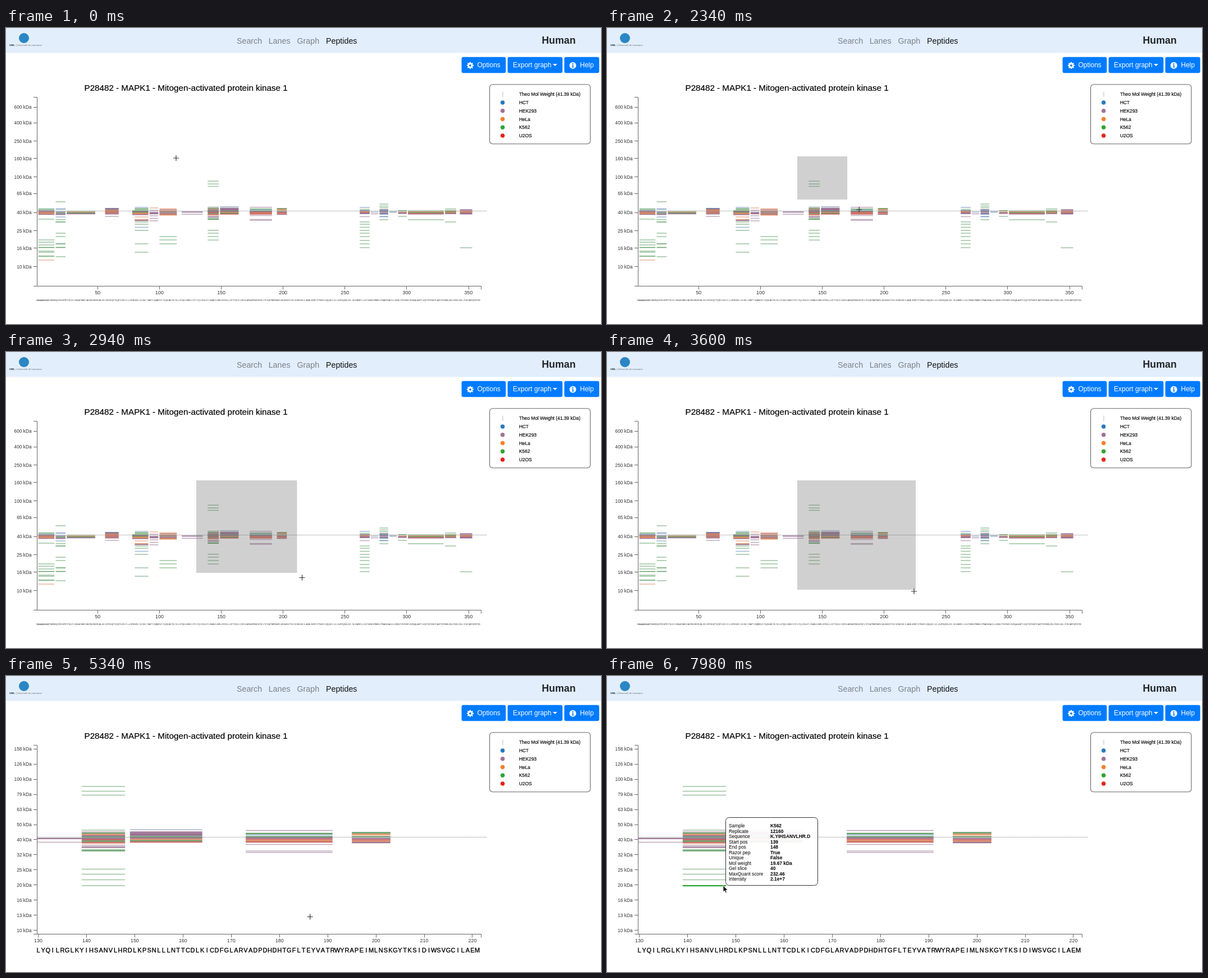
An HTML page for the animation above (8 s loop, 1060 by 528 pixels).

```html
<!DOCTYPE html>
<html lang="en">
<head>
<meta charset="utf-8">
<title>Peptide view</title>
<style>
html, body { margin: 0; width: 100%; height: 100%; overflow: hidden; background: #fff; }
svg { display: block; width: 100vw; height: 100vh; font-family: "Liberation Sans", Arial, sans-serif; }
</style>
</head>
<body>
<svg id="stage" viewBox="0 0 1060 528"></svg>
<script>
const LOOP = 8000, STEP = 60;
const ZOOM_AT = 4560, PRESS = 1500, RELEASE = 3240, BRUSH_LAG = 120, TIP_AT = 7680;
const LEFT = 55.5, BASE = 460.5, TOP = 123;
const COLORS = { b: '#2879bd', p: '#9f7298', o: '#f97f2a', g: '#2ea42f', r: '#e5231b' };
const MUTED = { b: '#5580a8', p: '#8c5f86', o: '#d97a4a', g: '#4b9150', r: '#c4524c' };
const SEQ = 'MAAAAAAGAGPEMVRGQVFDVGPRYTNLSYIGEGAYGMVCSAYDNVNKVRVAIKKISPFEHQTYCQRTLREIKILLRFRHENIIGIND' +
  'IIRAPTIEQMKDVYIVQDLMETDLYKLLKTQHLSNDHICYFLYQILRGLKYIHSANVLHRDLKPSNLLLNTTCDLKICDFGLARVADPDHDHTGFLTEYVATRWYR' +
  'APEIMLNSKGYTKSIDIWSVGCILAEMLSNRPIFPGKHYLDQLNHILGILGSPSQEDLNCIINLKARNYLLSLPHKNKVPWNRLFPNADSKALDLLDKMLTFNPHK' +
  'RIEVEQALAHPYLEQYYDPSDEPIAEPFKFDMELDDLPKEKLKELIFEETARFQPGYRS';

// Start, end, then bands: a level in overview pixels and a run of colours
// stacked downwards from it. Capitals are strong bands.
const PEPTIDES = [
  [2, 15, '323G 325.5BOPOOP 341g 378g 382g 387g 391.5G 398g 400g 407G 414o'],
  [16, 24, '310g 323B 327bpGpP 337b 342g 346G 366g 372g 385G 391.5G 408g'],
  [25, 48, '326.8g 328.5OGP'],
  [56, 67, '321.8BPOROPOP 336p'],
  [78, 91, '326GPGOOP'],
  [80, 91, '320b 322.5Gg 337o 342OP 346g 350g 355.5b 361g 385g 400g'],
  [92, 99, '321o 325p 328.5pPP 335p 339.5p 344p'],
  [100, 114, '323OpoOBOPO 334o 372g 378g 385g'],
  [118, 135, '328.3P 332.2p', 139],
  [139, 148, '273.2g 278.2g 282.4g 319.4g 321.2pGOPGPRGRo 335.7p 337.5P 339.9g 341.2G 360.7g 366g 371.9g 378.2g'],
  [149, 164, '318.8b 321p 322.1PPPGPOGR'],
  [173, 191, '319.8p 323Gb 326.3GPROR 334.6p 341.5p 343p'],
  [195, 203, '322.1G 323.7OoG 328.3PROP'],
  [262, 270, '320b 323.5g 325.5BOOPP 336.5p 346g 350g 355.5g 361g 366g 372g 379g 385g 391.7g'],
  [271, 277, '328.5b 331.5p'],
  [278, 285, '314g 317.5g 320.5g 323.5pBgPpPB 336.5B 342g'],
  [286, 292, '327b 329b'],
  [293, 300, '326G 328.5OPp 336g'],
  [301, 330, '326.3g 328OGRp 342g'],
  [331, 340, '322.8g 325.5gOGOP 346g'],
  [343, 353, '324P 326POOPP 392g']
];

// time, x, y of the pointer
const TRACK = [
  [0, 303, 232], [900, 303, 232], [1440, 339, 229], [1560, 339, 229], [1680, 349, 237], [1800, 354, 243],
  [2520, 481, 351], [2640, 505, 381], [3240, 550, 424], [3600, 547, 427], [4300, 541.7, 429.5],
  [5400, 541.7, 429.5], [6420, 420, 379], [7640, 216, 377], [7800, 207, 374], [8000, 207, 374]
];

const overview = {
  x: i => 53.2 + 2.2023 * i,
  y: level => level,
  masses: [600, 400, 250, 160, 100, 65, 40, 25, 16, 10],
  first: 1, last: 360, every: 50, width: 1.5, strong: 1.7, seqSize: 2.6, seqY: 487
};
const detail = {
  x: i => 57.5 + 8.594 * (i - 130),
  y: level => 453.8 - (425.5 - level) / 0.5932,
  masses: Array.from({ length: 13 }, (_, k) => 10 ** (2.2 - k / 10)),
  first: 130, last: 221, every: 10, width: 1.6, strong: 2.3, seqSize: 11, seqY: 493, zoomed: true
};

const stage = document.getElementById('stage');

function add(parent, tag, attrs, content) {
  const node = document.createElementNS('http://www.w3.org/2000/svg', tag);
  for (const key in attrs) node.setAttribute(key, attrs[key]);
  if (content !== undefined) node.textContent = content;
  parent.appendChild(node);
  return node;
}
const text = (parent, x, y, size, content, more) =>
  add(parent, 'text', { x, y, 'font-size': size, fill: '#000', ...more }, content);
const path = (parent, d, stroke, width = 1, more) =>
  add(parent, 'path', { d, stroke, 'stroke-width': width, fill: 'none', ...more });
const rect = (parent, x, y, width, height, more) =>
  add(parent, 'rect', { x, y, width, height, ...more });
const dot = (parent, cx, cy, r, fill) => add(parent, 'circle', { cx, cy, r, fill });
const half = v => Math.round(v - 0.5) + 0.5;
const levelOf = mass => 425.5 - 69.48 * Math.log(mass / 10);

function drawHeader() {
  rect(stage, 0, 0, 1060, 44.4, { fill: '#e2eefc' });
  dot(stage, 32, 18, 9, '#2a86c4');
  text(stage, 6, 31.8, 4.2, 'UNIL', { 'font-weight': 'bold', fill: '#222' });
  text(stage, 17.6, 31.8, 4.2, '| Université de Lausanne', { fill: '#666' });
  [['Search', 411], ['Lanes', 467.7], ['Graph', 518.5], ['Peptides', 570]].forEach(([name, x], i) =>
    text(stage, x, 27.5, 14.25, name, { fill: i === 3 ? '#111' : '#7b8187' }));
  text(stage, 954.5, 28, 17.8, 'Human', { 'font-weight': 'bold', fill: '#212529' });
}

function drawButtons() {
  [[811.6, 78.8], [893.6, 97.8], [994.6, 62.2]].forEach(([x, w]) =>
    rect(stage, x, 51.8, w, 28.5, { rx: 3.2, fill: '#007bff' }));
  const label = (x, s) => text(stage, x, 70.2, 12, s, { fill: '#fff' });
  label(839.5, 'Options');
  label(903, 'Export graph');
  label(1022.5, 'Help');
  add(stage, 'circle', { cx: 827, cy: 66.8, r: 3.2, fill: 'none', stroke: '#fff', 'stroke-width': 2.6 });
  for (let a = 0; a < 8; a++)
    rect(stage, 825.8, 60.8, 2.4, 2.4, { fill: '#fff', transform: `rotate(${a * 45} 827 66.8)` });
  path(stage, 'M974 64h8l-4 4z', 'none', 0, { fill: '#fff' });
  dot(stage, 1009.8, 66.8, 6, '#fff');
  dot(stage, 1009.8, 63.7, 1.1, '#007bff');
  path(stage, 'M1008.4 66.2h1.6v3.6m-1.8 0h3.4', '#007bff', 1.4);
}

function drawLegend() {
  rect(stage, 861.6, 100.8, 179.4, 105.9, { rx: 5.5, fill: '#fff', stroke: '#666', 'stroke-width': 1.1 });
  const rows = ['Theo Mol Weight (41.39 kDa)', 'HCT', 'HEK293', 'HeLa', 'K562', 'U2OS'];
  rows.forEach((name, i) => {
    const y = 118.3 + 14.75 * i;
    text(stage, 914, y + 3, 8.4, name, { stroke: '#000', 'stroke-width': 0.15 });
    if (i) dot(stage, 884.7, y, 3.7, Object.values(COLORS)[i - 1]);
    else path(stage, 'M885 113.5v9.5', '#bbb');
  });
}

function drawAxes(g, view) {
  const line = d => path(g, d, '#666');
  line(`M49 ${TOP + 0.5}H${LEFT}V${BASE}`);
  line(`M49 ${BASE}H846.5v6`);
  for (const mass of view.masses) {
    const y = view.y(levelOf(mass));
    line(`M49 ${half(y)}H${LEFT}`);
    text(g, 45.5, y + 3, 8.3, Math.round(mass) + ' kDa', { 'text-anchor': 'end', fill: '#333' });
  }
  for (let i = view.zoomed ? 130 : 50; i <= view.last; i += view.every) {
    line(`M${half(view.x(i))} ${BASE}v6`);
    text(g, view.x(i), 475.3, 8.9, i, { 'text-anchor': 'middle', fill: '#333' });
  }
}

function drawBands(g, view) {
  const plot = add(g, 'g', { 'clip-path': 'url(#plot)' });
  for (const [start, end, bands, zoomEnd] of PEPTIDES) {
    const x1 = view.x(start), x2 = view.x(view.zoomed && zoomEnd || end);
    if (x2 < LEFT || x1 > 846) continue;
    for (const band of bands.split(' ')) {
      const [, level, run] = band.match(/([\d.]+)(\w+)/);
      [...run].forEach((c, i) => {
        const y = view.y(+level + 1.4 * i), key = c.toLowerCase(), light = c === key;
        add(plot, 'line', {
          x1, x2, y1: y, y2: y, stroke: MUTED[key],
          'stroke-width': light ? view.width : view.strong, 'stroke-opacity': light ? 0.55 : 0.88
        });
      });
    }
  }
  path(g, `M${LEFT} ${half(view.y(levelOf(41.39)))}H857`, '#888', 1, { 'stroke-dasharray': '1.3 1.1' });
}

function drawSequence(g, view) {
  const letters = SEQ.slice(view.first - 1, view.last);
  const x = [...letters].map((_, i) => view.x(view.first + i).toFixed(1)).join(' ');
  text(g, x, view.seqY, view.seqSize, letters, {
    'text-anchor': 'middle', stroke: '#000', 'stroke-width': view.zoomed ? 0.35 : 0
  });
}

function drawView(view) {
  const g = add(stage, 'g', {});
  drawAxes(g, view);
  drawBands(g, view);
  drawSequence(g, view);
  return g;
}

function drawTip() {
  const g = add(stage, 'g', {});
  rect(g, 211.5, 252.5, 164, 121, { rx: 6, fill: '#fff', 'fill-opacity': 0.93, stroke: '#333' });
  [['Sample', 'K562'], ['Replicate', '12160'], ['Sequence', 'K.YIHSANVLHR.D'], ['Start pos', '139'],
    ['End pos', '148'], ['Razor pep', 'True'], ['Unique', 'False'], ['Mol weight', '19.67 kDa'],
    ['Gel slice', '40'], ['MaxQuant score', '232.46'], ['Intensity', '2.1e+7']].forEach(([name, value], i) => {
    const y = 270.4 + 9.47 * i;
    text(g, 217, y, 8.4, name);
    text(g, 291, y, 8.4, value, { 'font-weight': 'bold' });
  });
  return g;
}

const clip = add(add(stage, 'defs', {}), 'clipPath', { id: 'plot' });
rect(clip, LEFT, TOP, 846 - LEFT, BASE - TOP);
drawHeader();
drawButtons();
text(stage, 139.5, 111.6, 15.2, 'P28482 - MAPK1 - Mitogen-activated protein kinase 1', { stroke: '#000', 'stroke-width': 0.2 });
drawLegend();
const wide = drawView(overview), near = drawView(detail);
const brush = rect(stage, 339, 229, 0, 0, { fill: '#777', 'fill-opacity': 0.34 });
const picked = path(stage, `M${detail.x(139)} 374.2H${detail.x(148)}`, COLORS.g, 2.2);
const tip = drawTip();
const cross = path(stage, 'M-5 0H5M0 -5V5', '#333', 1.2);
const arrow = path(stage, 'M0 0V11.2L2.6 8.8L4.4 12.8L6.3 12L4.6 8.1H8.2Z', '#fff', 0.8, { fill: '#000' });

function pointer(t) {
  const k = Math.max(1, TRACK.findIndex(p => p[0] >= t));
  const [t0, x0, y0] = TRACK[k - 1], [t1, x1, y1] = TRACK[k];
  const u = (t - t0) / (t1 - t0);
  return [x0 + (x1 - x0) * u, y0 + (y1 - y0) * u];
}
const show = (node, on) => node.setAttribute('display', on ? 'inline' : 'none');

function render(t) {
  const zoomed = t >= ZOOM_AT, hover = t >= TIP_AT;
  show(wide, !zoomed);
  show(near, zoomed);

  show(brush, t > PRESS && !zoomed);
  const [bx, by] = pointer(Math.min(Math.max(t - BRUSH_LAG, PRESS), RELEASE));
  brush.setAttribute('width', bx - 339);
  brush.setAttribute('height', by - 229);

  show(picked, hover);
  show(tip, hover);
  tip.setAttribute('opacity', Math.min(1, Math.max(0, (t - TIP_AT + STEP) / 200)));

  const [x, y] = pointer(t);
  show(cross, !hover);
  show(arrow, hover);
  cross.setAttribute('transform', `translate(${x} ${y})`);
  arrow.setAttribute('transform', `translate(${x} ${y})`);
}

const began = performance.now();
function tick() {
  const t = (performance.now() - began) % LOOP;
  render(Math.floor(t / STEP) * STEP);
  requestAnimationFrame(tick);
}
tick();
</script>
</body>
</html>
```
